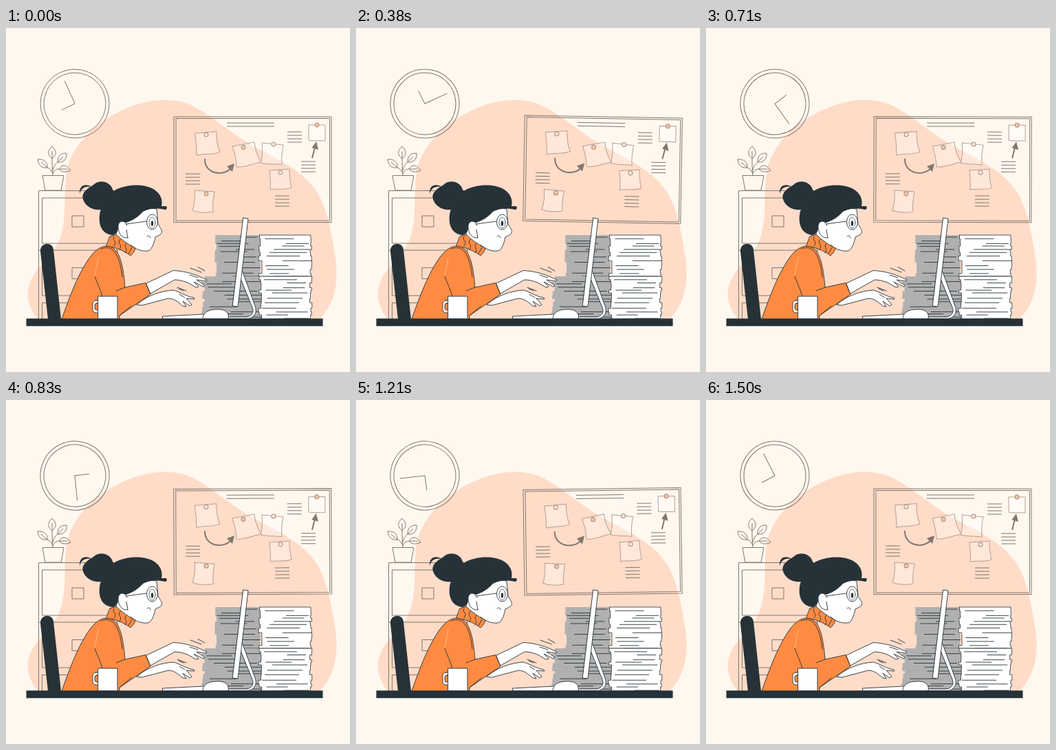
Write an HTML page that moves like this. It is 500 px wide and 500 px high and loops after 1.54 s.

```html
<!DOCTYPE html>
<html lang="en">
<head>
<meta charset="utf-8">
<title>Busy desk</title>
<style>
html, body { margin: 0; width: 100%; height: 100%; overflow: hidden; background: #fff8ef; }
svg { display: block; width: 100vw; height: 100vh; }
.thin { fill: none; stroke: #81776f; stroke-width: 1; }
.note { fill: #fff; fill-opacity: .3; stroke: #b5a094; }
.pin { fill: #ffe6d7; stroke: #a08d82; }
.pin .warm { fill: #ffc4a0; }
.ink { fill: none; stroke: #263238; stroke-width: .9; stroke-linejoin: round; stroke-linecap: round; }
.white { fill: #fff; }
.grey { fill: #b0b0b0; stroke: none; }
.orange { fill: #ff8b42; }
.dark { fill: #263238; stroke: none; }
</style>
</head>
<body>
<svg viewBox="0 0 500 500">
  <path fill="#ffdcc8" d="M46 423C28 400 27 377 43 355C59 334 75 323 81 297C89 268 82 235 90 200C102 163 135 135 168 120C205 102 246 99 275 115C301 129 323 150 357 170C397 193 432 206 453 240C469 268 474 304 479 335C484 372 477 401 456 423Z"/>

  <g class="thin">
    <g id="clock">
      <circle cx="100" cy="110" r="50"/><circle cx="100" cy="110" r="45"/>
      <path d="M85.300 77L100 110L81 119"/>
    </g>
    <path d="M53 214.500H84L80 236H57ZM68 214C67 204 67 196 67 189M67 190C59 183 61 178 67 172C74 179 74 184 67 190V179M68 207C69 201 72 197 75 195M75 195C75 185 80 182 88 182C89 191 83 196 75 195L83 187M67 210C65 205 63 204 60 203M60 203C51 204 47 199 46 191C55 190 61 195 60 203L51 195M68 212C70 207 73 205 77 205M77 205C82 197 88 199 94 207C87 210 81 210 77 205H89"/>
    <path d="M47.500 423V236.500H162V423M52.500 247H157V313H52.500ZM47.500 323H162M52.500 323V389H157M52.500 423V399.500H157M96 273H113V289H96ZM96 348.500H113V364.500H96Z"/>

    <g id="board">
      <path d="M244 129H473V282.500H244ZM247 131.500H470.500V280H247ZM321 138H390M321 143H390"/>
      <path id="memo"/>
      <g class="note">
        <path d="M274.500 153L306 150.500C306 162 307 172 311 180C300 185 289 182 277 185C277 173 276 163 274.500 153Z"/>
        <path d="M329 172L361 166C362 177 366 187 371 195C358 197 348 203 335 202C335 191 332 181 329 172Z"/>
        <path d="M372 167L403 170C401 180 400 190 401 199C391 197 381 199 370 196C373 187 373 177 372 167Z"/>
        <path d="M383 207L412 205C412 215 413 224 415 232C405 236 395 233 384 235C385 226 384 217 383 207Z"/>
        <path d="M440 141H464V164C456 163 448 165 440 163Z"/>
        <path d="M274 236L303 238C301 249 300 259 301 267C291 269 281 269 271 265C274 256 275 246 274 236Z"/>
      </g>
      <g class="pin">
        <circle cx="291" cy="155" r="3"/><circle class="warm" cx="345" cy="173.500" r="3"/>
        <circle cx="389" cy="169" r="3"/><circle cx="399" cy="210" r="3"/>
        <circle class="warm" cx="452" cy="141" r="3"/><circle class="warm" cx="291" cy="241" r="3"/>
      </g>
      <path stroke-width="2" d="M289 190C288 212 316 217 328 203M445 189L449 173"/>
      <path fill="#81776f" stroke="none" d="M332 197L329 209L321 201ZM451 165L454 177L444.500 174Z"/>
    </g>
  </g>

  <g class="ink" id="papers"></g>

  <g class="ink">
    <path class="white" d="M343 352L362 404C366 414 360 422 351 422.500H322V420H350C357 419 361 413 358 406L340 362Z"/>
    <path class="white" d="M345 276L352 277L337 405L329.500 404Z"/>
    <path class="white" d="M228 419L288 416V423H228Z"/>
    <path class="white" d="M286 422.500C286 413 295 409 306 409C319 408 325 414 323 422.500Z"/>

    <path class="dark" d="M50 325C49 311 68 310 69 322L80 423H61Z"/>
    <path class="white" d="M190 402C205 389 225 382 243 381C252 383 261 390 273 392L274 394L262 393L270 402L267 404L257 397L262 405L257 404C250 398 244 393 236 393L198 403Z"/>
    <path class="orange" d="M81 423C92 392 103 362 118 339C127 325 136 317 147 317C164 318 170 340 173 377L203 370.500L210 387L165 418V423Z"/>
    <path d="M138 321C157 313 166 333 169 362M173 377L160 382M165 418L182 404M129 361C133 372 138 382 140 390"/>
    <path stroke="#ffc9a5" stroke-dasharray="3 2" d="M134 334L129 360"/>
    <path class="white" d="M204 371L243 352.500C255 353 270 356 283 362L292 366L291 368L277 366L289 374L287 376L273 369L280 376L276 377L264 370C256 367 250 366 245 366L210 386Z"/>
    <path d="M268 349L284 355M279 347.500L289 353M249 377L262 382M251 379L258 382M267 359L279 363M252 387L260 392"/>

    <path class="white" d="M162 283L178 270L205 261L219 263L221 285C224 290 228 295 226 298C224 302 219 302 217 304C215 314 211 324 206 324C197 325 187 321 181 315L187 322L160 304Z"/>
    <path class="orange" d="M151 303L160 300C168 308 178 315 188 320C187 325 184 328 181 331C171 323 159 319 146 317Z"/>
    <path d="M157 303C153 309 163 309 157 317M166 307C160 314 171 314 165 322M175 313C169 319 179 320 173 327M183 319L178 328"/>
    <path class="dark" d="M158 236C175 226 205 226 217 236C225 242 228 250 226 259L233 259C235 262 233 264 231 264C217 261 206 263 199 267C190 277 181 281 174 283C168 279 163 282 163 290C163 297 160 299 155 301C141 300 134 288 136 272C137 262 142 257 147 252Z"/>
    <path class="dark" d="M112 249C109 239 119 233 127 228C137 219 152 224 155 235C164 243 154 258 143 263C130 267 116 261 112 249ZM107 241C106 227 117 226 125 231C115 229 109 233 107 241Z"/>
    <path class="white" d="M176 287C173 279 164 279 163 288C163 297 167 306 177 305"/>
    <path d="M174 285L204 281M175 293L177 305M205 303C207 301 210 302 210 305"/>
    <ellipse class="white" cx="212.500" cy="282" rx="8" ry="11"/>
    <ellipse cx="212.500" cy="283" rx="4.500" ry="8" stroke-width=".7"/>
    <ellipse class="dark" cx="212.500" cy="284" rx="1.700" ry="3.800"/>

    <rect class="white" x="126" y="396" width="14" height="18" rx="5"/>
    <rect class="orange" x="129" y="400" width="10" height="10" rx="3"/>
    <rect class="white" x="134" y="390" width="28" height="33"/>
    <rect class="dark" x="29.500" y="422.300" width="431" height="11"/>
  </g>
</svg>
<script>
const $ = id => document.getElementById(id);
const LOOP = 1540, FPS = 24, SPIN = 238; // ms, steps and degrees per second

let seed = 11;
const random = () => (seed = seed * 16807 % 2147483647) / 2147483647;
const between = (low, high) => low + (high - low) * random();

const memo = (x, y) => [0, 5, 10, 15].map(dy => `M${x} ${y + dy}h21`).join('');
$('memo').setAttribute('d', memo(409, 151) + memo(429, 194) + memo(261, 212) + memo(391, 244));

// A bundle of unevenly stacked sheets
function bundle(tone, left, right, top, bottom) {
  let leftEdge = '', rightEdge = '', lines = '';
  for (let y = top, next; y < bottom; y = next) {
    next = Math.min(bottom, y + between(3, 8));
    const a = left + between(-2, 3), b = right + between(-2, 2);
    rightEdge += `L${b} ${y}V${next}`;
    leftEdge = `L${a} ${next}V${y}` + leftEdge;
    const length = (b - a) * between(.35, .75);
    const start = random() < .5 ? a + between(2, 12) : b - length - between(0, 10);
    lines += `M${start} ${next}h${length}`;
  }
  $('papers').innerHTML += `<path class="${tone}" stroke-width=".8"
    d="M${left} ${top}${rightEdge}${leftEdge}Z"/><path d="${lines}"/>`;
}

bundle('grey', 304, 370, 301, 361);
bundle('grey', 286, 374, 361, 423);
bundle('white', 369, 443, 301, 361);
bundle('white', 369, 443, 361, 423);

function draw(now) {
  const step = Math.floor((now % LOOP + 5) * FPS / 1000);
  const angle = step * SPIN / FPS;
  const sway = Math.asin(Math.sin(angle * Math.PI / 180)) * 2 / Math.PI;
  $('clock').setAttribute('transform', `rotate(${angle} 100 110)`);
  $('board').setAttribute('transform', `rotate(${sway} 358.5 205.75)`);
  requestAnimationFrame(draw);
}
draw(0);
</script>
</body>
</html>
```
